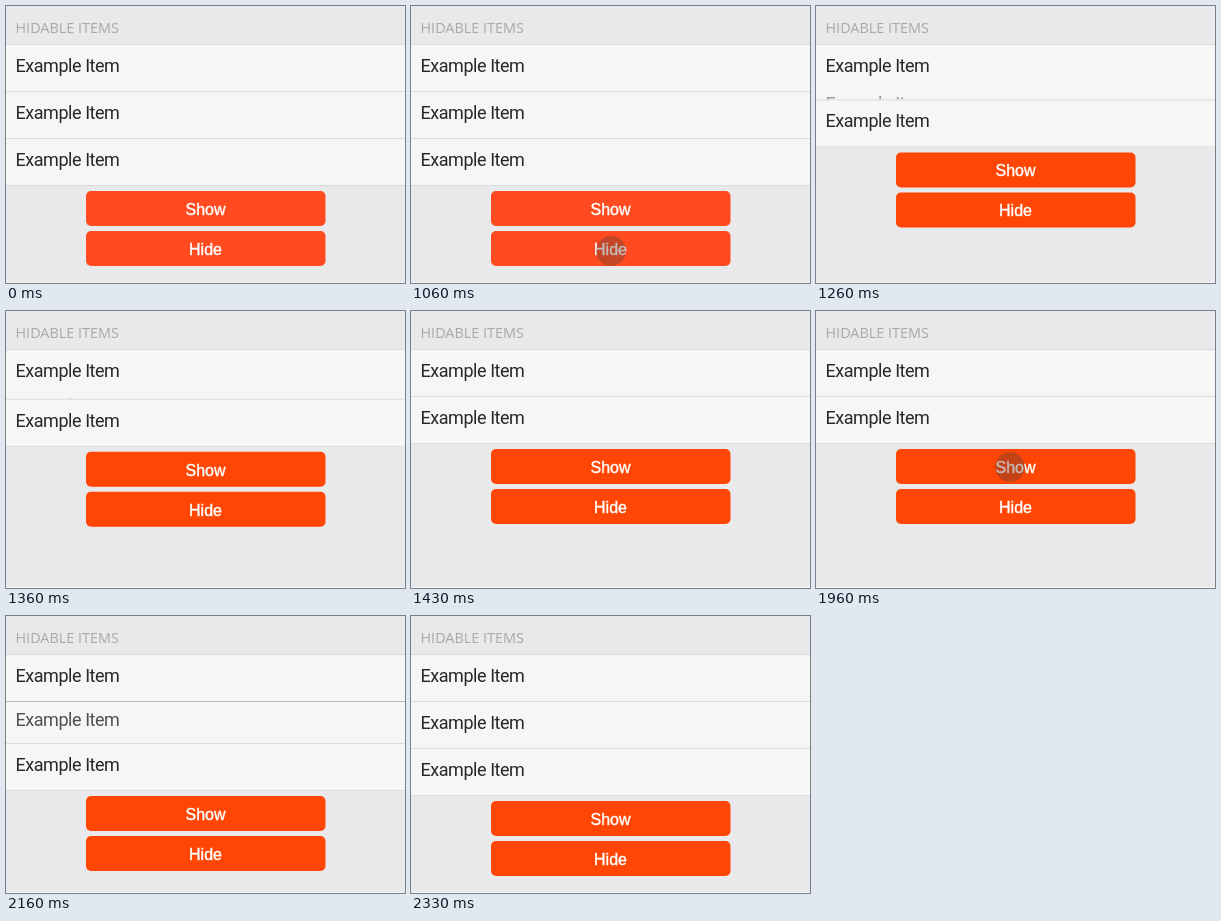
These frames come from a looping animation (399x277 px, 3500 ms). An HTML page:

```html
<!DOCTYPE html>
<html lang="en">
<head>
<meta charset="utf-8">
<title>Hidable items</title>
<style>
  html, body { margin: 0; width: 100%; height: 100%; overflow: hidden; background: #e9e9eb; }
  svg { display: block; width: 100%; height: 100%; }
  .head { font: 14.4px "Open Sans", sans-serif; fill: #a9a9a9; }
  .item { font: 18px Roboto, sans-serif; letter-spacing: -.45px; fill: #272727; }
  .label { font: 16px "Liberation Sans", Arial, sans-serif; fill: #fff; stroke: #fff; stroke-width: .4px; text-anchor: middle; }
</style>
</head>
<body>
<svg id="stage" viewBox="0 0 399 277"></svg>
<script>
const LOOP = 3500, ROW = 47, TOP = 38;
const HIDE = [1130, 1430], SHOW = [2000, 2320];
const TAPS = [
  { from: 1060, to: 1130, x: 200, y: 245 },
  { from: 1960, to: 2000, x: 194, y: 156 }
];

const stage = document.getElementById('stage');

function add(parent, tag, attrs, text) {
  const el = document.createElementNS('http://www.w3.org/2000/svg', tag);
  set(el, attrs);
  if (text) el.textContent = text;
  parent.appendChild(el);
  return el;
}

function set(el, attrs) {
  for (const k in attrs) el.setAttribute(k, attrs[k]);
}

function addRow(parent, y) {
  const g = add(parent, 'g', { transform: `translate(0 ${y})` });
  add(g, 'rect', { width: 399, height: ROW + 1, fill: '#f6f6f4' });
  const line = add(g, 'rect', { width: 399, height: 1, fill: '#dcdcdc' });
  const text = add(g, 'text', { x: 9.5, y: 28, class: 'item' }, 'Example Item');
  return { line, text };
}

function addButton(parent, y, label) {
  const box = add(parent, 'rect', { x: 80, y, width: 239.5, height: 35, rx: 5 });
  add(parent, 'text', { x: 199.5, y: y + 24, class: 'label' }, label);
  return box;
}

add(stage, 'rect', { width: 399, height: 277, fill: '#e9e9eb' });
add(stage, 'rect', { y: 276, width: 399, height: 1, fill: '#f7f7f7' });
add(stage, 'text', { x: 9.5, y: 27, class: 'head' }, 'HIDABLE ITEMS');
addRow(stage, TOP);
const middle = addRow(stage, TOP + ROW);

// Everything below the hidable row, measured from that row's top.
const rest = add(stage, 'g', {});
add(rest, 'rect', { y: 1, width: 399, height: 191, fill: '#e9e9eb' });
addRow(rest, 0);
add(rest, 'rect', { y: ROW, width: 399, height: 1, fill: '#dcdcdc' });
const buttons = [addButton(rest, 53, 'Show'), addButton(rest, 93, 'Hide')];
add(stage, 'rect', { y: 276, width: 399, height: 1, fill: '#f7f7f7' });
const dot = add(stage, 'circle', { r: 15, fill: '#5a3c37', 'fill-opacity': .36 });

// CSS "ease": cubic-bezier(.25, .1, .25, 1)
function ease(x) {
  if (x <= 0) return 0;
  if (x >= 1) return 1;
  const curve = (a, b, s) => 3 * a * s * (1 - s) ** 2 + 3 * b * s * s * (1 - s) + s ** 3;
  let lo = 0, hi = 1;
  for (let i = 0; i < 24; i++) {
    const mid = (lo + hi) / 2;
    if (curve(.25, .25, mid) < x) lo = mid; else hi = mid;
  }
  return curve(.1, 1, lo);
}

const progress = (t, [from, to]) => ease((t - from) / (to - from));

// Hiding drops the content height at once, then shrinks the padding;
// showing starts at the content height and grows the padding.
function rowState(t) {
  if (t >= HIDE[0] && t < HIDE[1]) {
    const p = progress(t, HIDE), h = 2 + 24 * (1 - p);
    return { h, shift: h / 2 - 13, alpha: 1 - .75 * p, line: '#f6f6f4' };
  }
  if (t >= HIDE[1] && t < SHOW[0]) return { h: 0, shift: 0, alpha: 0, line: '#dcdcdc' };
  if (t >= SHOW[0] && t < SHOW[1]) {
    const p = progress(t, SHOW), h = 21 + 26 * p;
    return { h, shift: (h - ROW) / 2, alpha: p, line: '#bababa' };
  }
  return { h: ROW, shift: 0, alpha: 1, line: '#dcdcdc' };
}

function draw(t) {
  const { h, shift, alpha, line } = rowState(t);
  set(middle.text, { y: 28 + shift, opacity: alpha });
  set(middle.line, { fill: line });
  set(rest, { transform: `translate(0 ${TOP + ROW + h})` });
  for (const b of buttons) set(b, { fill: t < HIDE[0] ? '#ff4b1f' : '#ff4605' });

  const tap = TAPS.find(k => t >= k.from && t < k.to);
  set(dot, tap ? { cx: tap.x, cy: tap.y, visibility: 'visible' } : { visibility: 'hidden' });
}

const start = performance.now();
function tick() {
  draw((performance.now() - start) % LOOP);
  requestAnimationFrame(tick);
}
tick();
</script>
</body>
</html>
```
